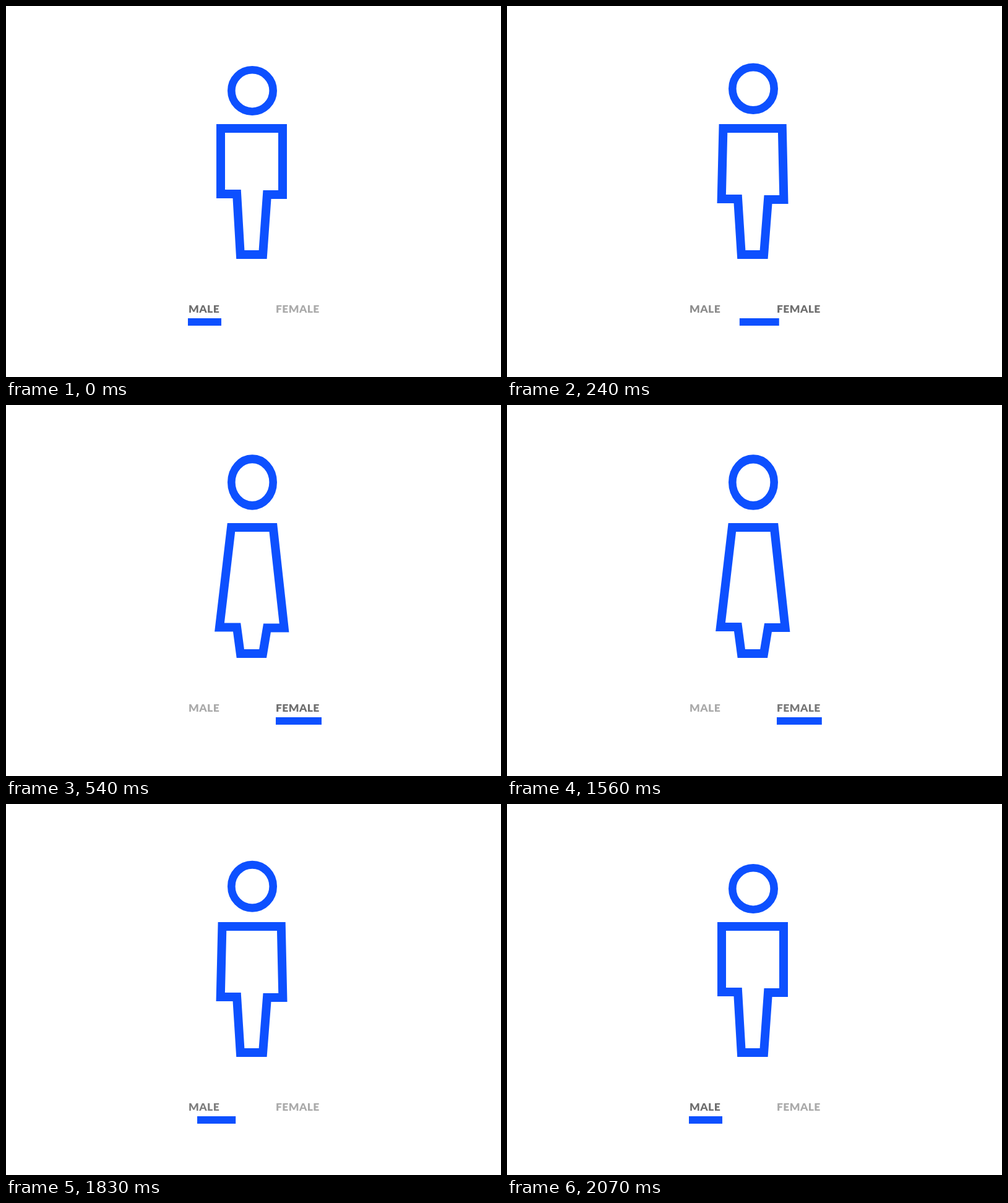
Animation, 800 px wide and 600 px high, one loop 2670 ms. Source, as an HTML page:

```html
<!DOCTYPE html>
<html lang="en">
<head>
<meta charset="utf-8">
<title>Male / Female toggle</title>
<style>
  html, body { margin: 0; height: 100%; overflow: hidden; background: #fff; }
  svg { display: block; width: 800px; height: 600px; }
  text { font: 900 17.5px Lato, sans-serif; letter-spacing: .4px; }
</style>
</head>
<body>
<svg viewBox="0 0 800 600">
  <g fill="none" stroke="#0d50ff">
    <circle id="head" r="33.7" stroke-width="12.6"/>
    <polygon id="body" stroke-width="14" stroke-miterlimit="10"/>
  </g>
  <rect id="bar" y="505" height="12" fill="#0d50ff"/>
  <text id="male" x="295" y="496">MALE</text>
  <text id="female" x="436" y="496">FEMALE</text>
</svg>
<script>
const LOOP = 2670, STEP = 30, RETURN_AT = 1530;
const [head, body, bar, male, female] =
  ['head', 'body', 'bar', 'male', 'female'].map(id => document.getElementById(id));

const clamp = x => Math.min(1, Math.max(0, x));
const mix = (a, b, p) => a + (b - a) * p;

// cubic-bezier(.5, 0, .5, 1), solved by bisection
function ease(x) {
  let lo = 0, hi = 1;
  for (let i = 0; i < 24; i++) {
    const t = (lo + hi) / 2;
    if (1.5 * t * (1 - t) + t ** 3 < x) lo = t; else hi = t;
  }
  return lo * lo * (3 - 2 * lo);
}

// Start and end step of each part, on the way to female and back
const timing = {
  head:   [[2, 18], [0.5, 16.5]],
  body:   [[4, 18], [0, 14]],
  left:   [[1, 14], [1, 13]],
  right:  [[0, 15], [0, 14]],
  male:   [[0, 16], [0, 16]],
  female: [[0, 7], [0, 7]],
};

function draw(time) {
  const back = time >= RETURN_AT;
  const step = Math.floor((time - (back ? RETURN_AT : 0)) / STEP);

  // 0 = male, 1 = female
  const progress = (part, curve = ease) => {
    const [start, end] = timing[part][+back];
    const p = curve(clamp((step - start) / (end - start)));
    return back ? 1 - p : p;
  };
  const gray = p => `rgb(${Array(3).fill(Math.round(mix(170, 110, p)))})`;

  const h = progress('head');
  head.setAttribute('transform', `translate(398 ${mix(137, 125, h)}) scale(1 ${mix(1, 1.118, h)})`);

  const b = progress('body'), hem = mix(304, 359.5, b);
  body.setAttribute('points', [
    [mix(347, 364, b), 198], [mix(447, 431.75, b), 198],
    [mix(447, 449.6, b), hem + 1], [422, hem + 1],
    [415.1, 402], [378.8, 402],
    [373.1, hem], [mix(347, 345, b), hem],
  ].join(' '));

  const left = mix(294, 436, progress('left'));
  bar.setAttribute('x', left);
  bar.setAttribute('width', mix(348, 510, progress('right')) - left);

  male.setAttribute('fill', gray(1 - progress('male')));
  female.setAttribute('fill', gray(progress('female', x => x)));
}

function frame() {
  draw(performance.now() % LOOP);
  requestAnimationFrame(frame);
}
frame();
</script>
</body>
</html>
```
